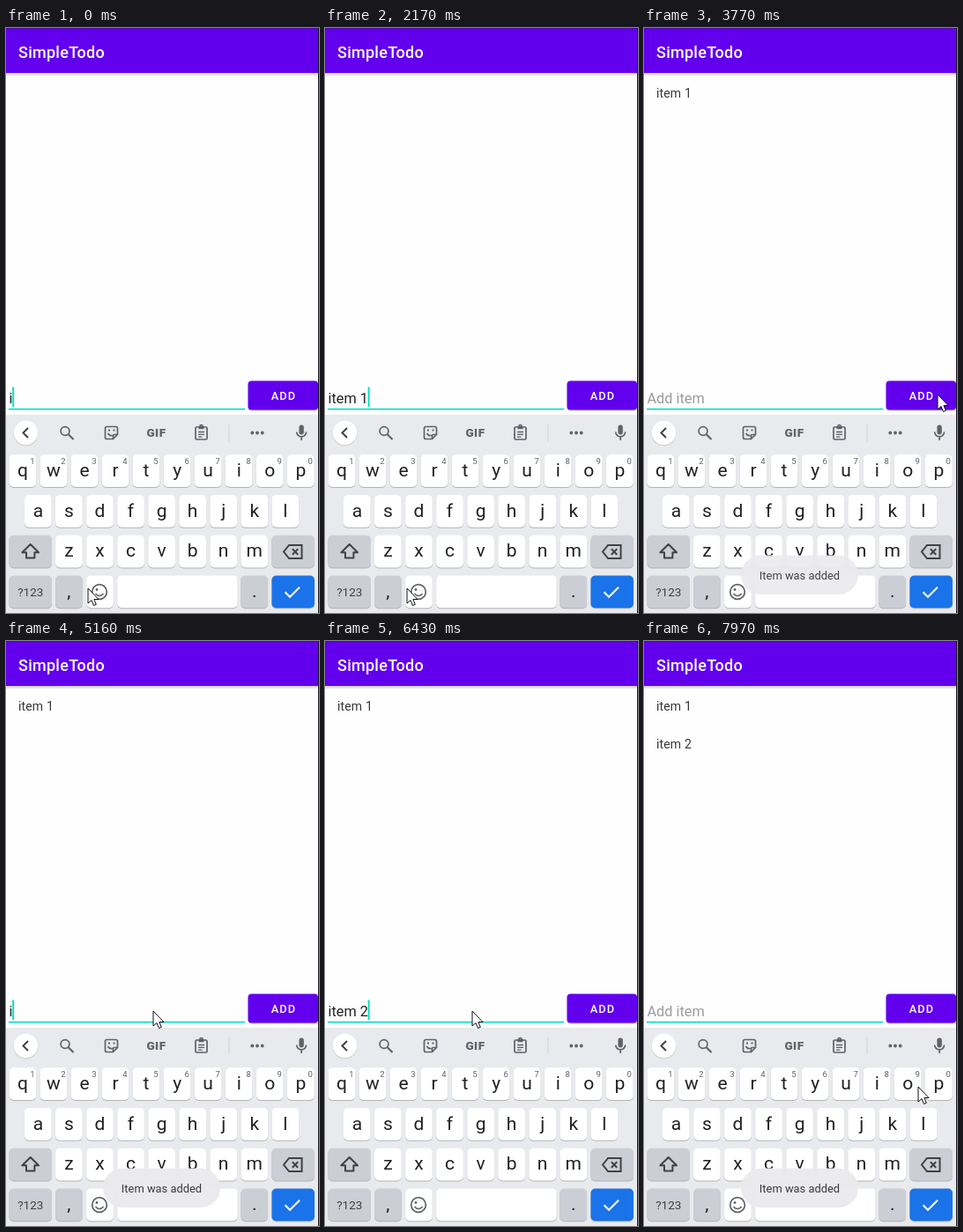
Animation of 355 by 664 pixels, one loop 8000 ms. Source, as an HTML page:

```html
<!DOCTYPE html>
<html lang="en">
<head>
<meta charset="utf-8">
<title>SimpleTodo</title>
<style>
  html, body { margin: 0; width: 100%; height: 100%; overflow: hidden; background: #fefefe; }
  svg { display: block; width: 355px; height: 664px; font-family: Roboto, sans-serif; }
  text { white-space: pre; }
  .mid { text-anchor: middle; }
  .key { font-size: 21px; fill: #202124; }
  .small { font-size: 13.5px; fill: #3c4043; }
  .digit { font-size: 9.5px; fill: #5f6368; }
  .sugg { font-size: 15px; fill: #3c4043; }
  .line { fill: none; stroke: #5f6368; stroke-width: 1.7; }
  .dark { stroke: #3f4246; stroke-width: 2; }
  .rule { fill: none; stroke: #d0d3d8; }
  .list { font-size: 14px; letter-spacing: .15px; fill: #363636; }
</style>
</head>
<body>
<svg viewBox="0 0 355 664">
  <defs>
    <linearGradient id="fade" x2="0" y2="1">
      <stop stop-color="#000" stop-opacity=".2"/>
      <stop offset="1" stop-color="#000" stop-opacity="0"/>
    </linearGradient>
    <clipPath id="btn"><rect x="274.5" y="400.5" width="79.5" height="33" rx="4"/></clipPath>
  </defs>

  <rect width="355" height="664" fill="#fefefe"/>
  <rect y="51" width="355" height="4" fill="url(#fade)"/>
  <rect width="355" height="51" fill="#6200ee"/>
  <rect width="355" height="1" fill="#4a08a8"/>
  <text x="14" y="34" font-size="18" font-weight="500" letter-spacing=".27" fill="#fff">SimpleTodo</text>

  <text id="item1" class="list" x="14" y="79">item 1</text>
  <text id="item2" class="list" x="14" y="122">item 2</text>

  <text id="field" x="3.5" y="425.5" font-size="16.3"></text>
  <rect x="3" y="431.8" width="268" height="1.6" fill="#03dac5"/>
  <rect id="caret" y="407.5" width="1.9" height="22.5" fill="#03dac5"/>

  <rect x="274.5" y="402" width="79.5" height="32.5" rx="4" fill="#000" opacity=".22"/>
  <rect x="274.5" y="400.5" width="79.5" height="33" rx="4" fill="#6200ee"/>
  <g clip-path="url(#btn)"><circle id="ripple" cy="416.5" fill="#fff"/></g>
  <text class="mid" x="315" y="422" font-size="12.7" font-weight="500" letter-spacing="1.1" fill="#fff">ADD</text>

  <rect y="439" width="355" height="225" fill="#e8eaed"/>
  <circle cx="22.5" cy="460.3" r="14" fill="#000" opacity=".13"/>
  <circle cx="22.5" cy="459.5" r="13.7" fill="#fff"/>
  <path id="chevron" class="line dark"/>

  <g id="tools" class="line">
    <circle cx="67" cy="457.5" r="4.9"/>
    <path d="M70.5 461l6 6" stroke-width="2.1"/>
    <path d="M114.5 452.5h10a2 2 0 0 1 2 2v7l-5 5h-7a2 2 0 0 1-2-2v-10a2 2 0 0 1 2-2zM121.5 466v-3.5a1 1 0 0 1 1-1h3.5M115.5 460q2 3.5 5 2.2"/>
    <path d="M116 456.5h2m3.5 0h2" stroke-width="2"/>
    <text class="mid" x="170.5" y="464.3" font-size="13.5" font-weight="900" letter-spacing=".5" fill="#5f6368" stroke="none">GIF</text>
    <rect x="215" y="453" width="13" height="14" rx="1.2"/>
    <path d="M218.5 453.5h6" stroke-width="3.4"/>
    <circle cx="221.5" cy="452" r="1.5"/>
    <path d="M218 458.5h7m-7 2.8h7m-7 2.8h4.5" stroke-width="1.3"/>
    <path class="rule" d="M253 449.5v20" stroke-width="1"/>
    <path d="M279.3 459.5h12" stroke-width="3.8" stroke-linecap="round" stroke-dasharray="0 5.7"/>
  </g>
  <g id="strip"><path class="rule" d="M131.5 450v19m95-19v19"/></g>
  <rect x="332.4" y="450.5" width="5.4" height="11" rx="2.7" fill="#5f6368"/>
  <path class="line" d="M329.7 458.5a5.4 5.4 0 0 0 10.8 0M335.1 464v4"/>

  <g id="keys"></g>
  <path class="line dark" d="M27.7 586l9.300 9.300h-4.600v6.200h-9.400v-6.200h-4.600z" stroke-linejoin="round"/>
  <path class="line dark" d="M321 587h14.500v15h-14.500l-6-7.500zm3.800 4.300l6.400 6.400m0-6.400l-6.400 6.400"/>
  <circle class="line" cx="106" cy="640" r="8.3"/>
  <path class="line" d="M101.500 642q4.500 5 9 0"/>
  <path class="line" d="M103 637.500h6" stroke-linecap="round" stroke-dasharray="0 6" style="stroke-width:2.800"/>
  <path d="M316.500 640.300l5.500 5.500 11-11" fill="none" stroke="#fff" stroke-width="2.100"/>

  <g id="toast">
    <rect x="110" y="598.500" width="133" height="44.500" rx="22" fill="#ebebed" opacity=".96"/>
    <text class="mid" x="176.500" y="626" font-size="12.900" fill="#3a3a3a">Item was added</text>
  </g>

  <path id="mouse" d="M0 0V17L4 13.500L6.500 19.500L9.300 18.300L6.900 12.500H12Z" fill="#fff" stroke="#111"/>
  <rect x="354" width="1" height="664" fill="#17131d"/>
</svg>

<script>
const LOOP = 8000;
const $ = id => document.getElementById(id);
const set = (el, attrs) => { for (const k in attrs) el.setAttribute(k, attrs[k]); };
const show = (el, on) => set(el, { visibility: on ? 'visible' : 'hidden' });
const ramp = (t, from, to) => Math.min(1, Math.max(0, (t - from) / (to - from)));
const ease = p => p * p * (3 - 2 * p);

function add(parent, tag, attrs, text = '') {
  const el = document.createElementNS('http://www.w3.org/2000/svg', tag);
  set(el, attrs);
  el.textContent = text;
  parent.append(el);
  return el;
}

// Keyboard
const keys = $('keys');
const PITCH = 35.05, KEY = 30.7, WIDE = 48.5;
const GREY = '#cbced4';
const col = i => 3.5 + i * PITCH;
const row = i => 484.2 + i * 45.8;

function key(x, y, width, fill = '#fff', label = '', cls = 'key') {
  const box = { x, width, height: 36.7, rx: 5 };
  add(keys, 'rect', { ...box, y: y + 1, fill: '#000', opacity: .23 });
  add(keys, 'rect', { ...box, y, fill });
  add(keys, 'text', { x: x + width / 2, y: y + (cls === 'key' ? 24.5 : 23.3), class: `${cls} mid` }, label);
}

['qwertyuiop', 'asdfghjkl', 'zxcvbnm'].forEach((letters, r) => {
  const indent = (10 - letters.length) / 2;
  [...letters].forEach((c, i) => {
    const x = col(i + indent);
    key(x, row(r), KEY, '#fff', c);
    if (r === 0) add(keys, 'text', { x: x + 26.3, y: row(0) + 10.5, class: 'digit mid' }, (i + 1) % 10);
  });
});
key(col(0), row(2), WIDE, GREY);
key(col(8.5), row(2), WIDE, GREY);
key(col(0), row(3), WIDE, GREY, '?123', 'small');
key(col(1.5), row(3), KEY, GREY, ',');
key(col(2.5), row(3), KEY);
key(col(3.5), row(3), 136.5);
key(col(7.5), row(3), KEY, GREY, '.');
key(col(8.5), row(3), WIDE, '#1a73e8');

const slots = [84, 179, 273].map(x => add($('strip'), 'text', { x, y: 464.5, class: 'sugg mid' }));

// Each round types "item N" and presses ADD.
const rounds = [
  { start: 0, space: 1470, digit: 1870, idle: 2170, press: 3140 },
  { start: 5160, space: 6130, digit: 6240, idle: 6430, press: 7250 }
];
const CLEAR = 120, LISTED = 250, TOAST = 2000;

const edits = rounds.flatMap(({ start, space, digit, press }, n) => [
  ...[...'item'].map((_, i) => ({ t: start + (i && 120 + i * 150), text: 'item'.slice(0, i + 1) })),
  { t: space, text: 'item ' },
  { t: digit, text: `item ${n + 1}` },
  { t: press + CLEAR, text: '' }
]);

const moves = [
  { from: 2170, to: 2700, x: 333, y: 392 },
  { from: 2700, to: 2950, x: 333, y: 416 },
  { from: 3950, to: 4170, x: 167, y: 420 },
  { from: 6760, to: 7120, x: 297, y: 407 },
  { from: 7680, to: 7970, x: 311, y: 506 }
];

function pointer(t) {
  let x = 93, y = 636;
  for (const m of moves) {
    const p = ease(ramp(t, m.from, m.to));
    x += (m.x - x) * p;
    y += (m.y - y) * p;
  }
  return [x, y];
}

const suggest = text => text.includes(' ') ? ['is', 'in', 'and'] : [text + 's', text, 'itemized'];

function drawField(t) {
  const { t: since, text } = edits.findLast(e => e.t <= t);
  const field = $('field');
  field.textContent = text || 'Add item';
  set(field, { fill: text ? '#222' : '#9b9b9b' });
  set($('caret'), { x: 3.3 + (text ? field.getComputedTextLength() : 0) });
  show($('caret'), (t - since) % 1000 < 500);

  const busy = rounds.some(r => t >= r.start + 120 && t < r.idle);
  show($('tools'), !busy);
  show($('strip'), busy);
  set($('chevron'), { d: busy ? 'M20 454l5.5 5.5-5.5 5.5' : 'M25 454l-5.5 5.5 5.5 5.5' });
  if (busy) suggest(text).forEach((word, i) => { slots[i].textContent = word; });
}

function drawPress(t) {
  rounds.forEach((r, n) => show($('item' + (n + 1)), t >= r.press + LISTED));

  const { press } = rounds.findLast(r => t >= r.press) || { press: Infinity };
  const age = press < t ? t - press : 0;
  const grow = ramp(age, 0, CLEAR), fade = ramp(age, CLEAR, 450);
  set($('ripple'), {
    cx: pointer(press)[0],
    r: 25 + 65 * grow,
    opacity: age && (.09 + .15 * grow) * (1 - fade)
  });

  const up = age - LISTED;
  set($('toast'), { opacity: ramp(up, 0, 400) * (1 - ramp(up, TOAST, TOAST + 300)) });
}

function tick() {
  const t = performance.now() % LOOP;
  drawField(t);
  drawPress(t);
  set($('mouse'), { transform: `translate(${pointer(t)})` });
  requestAnimationFrame(tick);
}
tick();
</script>
</body>
</html>
```
